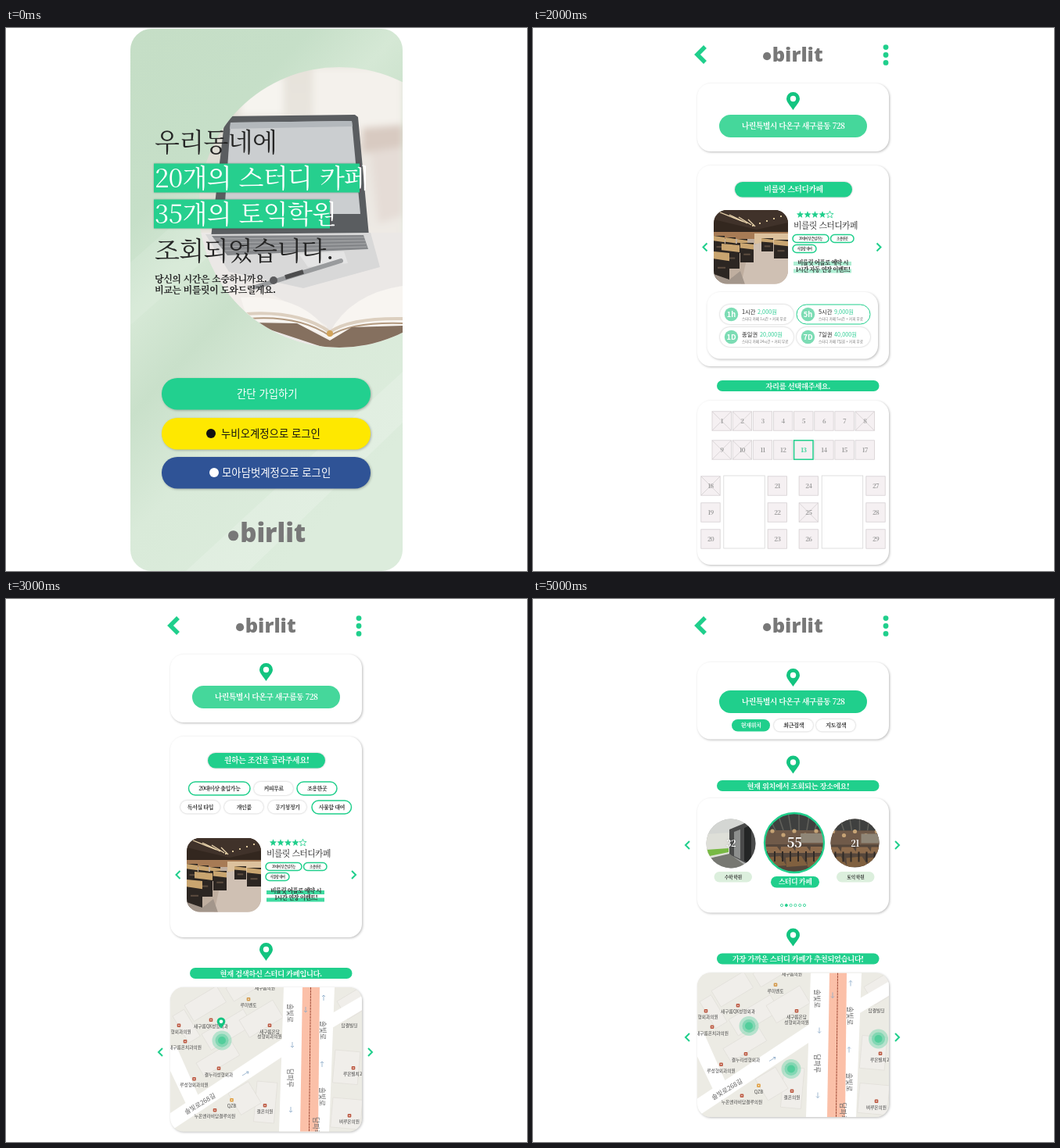
An HTML page that plays this animation: 666 px wide and 695 px high, repeating every 6 s.

```html
<!DOCTYPE html>
<html lang="ko">
<head>
<meta charset="utf-8">
<title>Study cafe app</title>
<style>
  html, body { margin: 0; width: 100%; height: 100%; overflow: hidden; background: #fff; }
  svg {
    display: block; width: 100%; height: 100%;
    font-family: "Noto Serif CJK KR", "Noto Serif KR", "Noto Serif", "Noto Sans CJK KR", serif;
    font-weight: 600; letter-spacing: -.04em;
  }
  .sans { font-family: "Noto Sans CJK KR", "Noto Sans", sans-serif; letter-spacing: 0; }
  .logo { font-family: "Open Sans", sans-serif; font-weight: 800; letter-spacing: 0; }
  .card { filter: drop-shadow(1px 1px 1.5px #0004); }
  .soft { filter: drop-shadow(.8px .8px 1px #0004); }
  .blur { filter: blur(5px); }
</style>
</head>
<body>
<svg id="stage" viewBox="0 0 666 695"></svg>
<script>
const GREEN = '#20cf8c', PIN = '#13c480', DARK = '#252525', CENTER = 332.5;
const REGULAR = 'font-weight="400"';

// Drawing helpers: every one returns SVG markup.
const rect = (x, y, w, h, fill, rx = 0, more = '') =>
  `<rect x="${x}" y="${y}" width="${w}" height="${h}" rx="${rx}" fill="${fill}" ${more}/>`;
const circle = (x, y, r, fill, more = '') => `<circle cx="${x}" cy="${y}" r="${r}" fill="${fill}" ${more}/>`;
const poly = (points, fill, more = '') => `<polygon points="${points}" fill="${fill}" ${more}/>`;
const line = (d, stroke, width = 1, more = '') =>
  `<path d="${d}" fill="none" stroke="${stroke}" stroke-width="${width}" ${more}/>`;
const text = (x, y, size, label, fill = DARK, more = '') =>
  `<text x="${x}" y="${y}" font-size="${size}" fill="${fill}" ${more}>${label}</text>`;
const mid = (x, y, size, label, fill, more = '') => text(x, y, size, label, fill, 'text-anchor="middle" ' + more);
const move = (x, y, body) => `<g transform="translate(${x} ${y})">${body}</g>`;
const clip = (id, shape, body) =>
  `<clipPath id="${id}">${shape}</clipPath><g clip-path="url(#${id})">${body}</g>`;
const repeat = (n, draw) => Array.from({ length: n }, (_, i) => draw(i)).join('');

const card = (y, bottom, x = 210, w = 245) => rect(x, y, w, bottom - y, '#fff', 17, 'class="card"');
const pill = (x, y, w, h, fill, label, size, color = '#fff', more = '') =>
  rect(x, y, w, h, fill, h / 2, more) + mid(x + w / 2, y + h / 2 + size * .36, size, label, color);
const chip = (x, y, w, h, label, size, on) =>
  pill(x, y, w, h, '#fff', label, size, DARK, on ? `stroke="${GREEN}" stroke-width="1.5"` : 'class="soft"');
const banner = (y, label) =>
  rect(235, y, 207.5, 14, GREEN, 7) + mid(CENTER + 6, y + 10.6, 9.6, label, '#fff');
const chevron = (x, y, dir, size = 5, width = 2) =>
  line(`M${x - dir * size / 2} ${y - size} l${dir * size} ${size} l${-dir * size} ${size}`, GREEN, width);
const arrows = (y, left = 197.5, right = 465.5) => chevron(left, y, -1) + chevron(right, y, 1);
const pin = (x, y, s = 1) => `<g transform="translate(${x} ${y}) scale(${s})">
  <path d="M0 23C-3 18-8.5 13-8.5 8.5a8.5 8.5 0 0 1 17 0C8.5 13 3 18 0 23z" fill="${PIN}"/>
  ${circle(0, 8.5, 3.7, '#fff')}</g>`;
const star = (x, y, full) => poly(repeat(10, i => {
  const a = i * Math.PI / 5, r = i % 2 ? 2.1 : 4.8;
  return `${(x + r * Math.sin(a)).toFixed(2)},${(y - r * Math.cos(a)).toFixed(2)} `;
}), full ? GREEN : '#fff', full ? '' : `stroke="${GREEN}" stroke-width=".8"`);
const logo = (x, y, size) => circle(x + size * .2, y - size * .25, size * .2, '#787878') +
  text(x + size * .46, y, size, 'birlit', '#787878', 'class="logo"');

const header = () => line('M220 24L210 34L220 44', GREEN, 5.5) +
  repeat(3, i => circle(451, 24.6 + i * 9.9, 3.4, GREEN)) + logo(294, 42.5, 25.5);
const address = (y, fill) => pill(238, y, 189, 29, fill, '나린특별시 다온구 새구름동 728', 10);

function laptopPhoto() {
  const room = rect(240, 45, 270, 370, 'url(#room)') +
    rect(240, 45, 55, 215, '#dedcd3') + rect(300, 62, 55, 50, '#f6f4ef') + rect(392, 50, 115, 95, '#f4f1ec') +
    poly('455,128 507,124 507,152 455,160', '#d8cac1') + poly('466,158 507,153 507,240 476,250', '#e5dcd6');
  return `<g class="blur">${room}</g>` +
    poly('247,262 507,262 507,410 260,410', '#ebe8e6') +
    poly('280,113 446,111 450,114 464,266 262,268', '#5a5d60') +
    poly('287,121 442,119 453,238 279,238', '#cbced0') + poly('287,121 442,119 443,126 286,129', '#b3b8bc') +
    poly('255,264 466,262 478,306 380,333 285,312', '#d8d8d8') +
    poly('263,266 457,265 463,283 283,291', '#85878a') +
    repeat(4, i => line(`M${266 + i * 4} ${270 + i * 5} L${458 + i} ${268 + i * 4}`, '#b4b5b6', .8)) +
    poly('375,290 432,286 437,301 386,306', '#e4e4e4') +
    line('M318 332L428 298', '#999b9d', 6, 'stroke-linecap="round"') +
    line('M357 319L380 312', '#4c4c4d', 6) + circle(342, 323, 5, '#5b5b5d') +
    poly('270,332 330,335 410,381 414,400 310,380', '#f2eeea') +
    '<path d="M300 345Q380 340 413 391Q440 340 507 330V385Q440 380 416 399Q370 370 310 377z" fill="#f8f5f1"/>' +
    line('M306 366Q374 361 414 389Q440 371 507 372', '#dccfbf', 4) +
    line('M310 372Q374 367 414 394Q442 376 507 378', '#b39a80', 2) +
    poly('310,377 372,378 414,400 442,383 507,381 507,410 410,410', '#85705f') +
    circle(414, 391, 4, '#d2a45b');
}

function home() {
  const button = (y, fill) => rect(199, y, 267, 40.5, fill, 20, 'class="card"');
  const login = (x, y, label, fill) => text(x, y, 13.4, label, fill, 'class="sans" font-weight="500"');
  const headline = (y, label, fill) => text(190, y, 33, label, fill, REGULAR);
  const marker = (y, w) => rect(189, y, w, 37, '#26cf8e', 0, 'class="soft"');
  return `<defs>
    <linearGradient id="mint" x1="0" y1="0" x2=".55" y2="1">
      <stop stop-color="#c5dec6"/><stop offset=".28" stop-color="#c6dfc8"/><stop offset=".42" stop-color="#d5e8d5"/>
      <stop offset=".55" stop-color="#c9e0ca"/><stop offset=".72" stop-color="#d9ead9"/><stop offset="1" stop-color="#dcecdc"/>
    </linearGradient>
    <linearGradient id="room" x2="0" y2="1"><stop stop-color="#e6e2da"/><stop offset="1" stop-color="#f3efec"/></linearGradient>
  </defs>` +
    clip('phone', rect(159, 1, 348, 694, '#000', 27),
      rect(159, 1, 348, 694, 'url(#mint)') +
      poly('507,440 507,505 310,695 230,695', '#fff', 'opacity=".16"') +
      poly('159,300 159,380 330,230 330,150', '#fff', 'opacity=".1"') +
      clip('lens', circle(426, 229.5, 179.5), laptopPhoto())) +
    marker(173.5, 263) + marker(219.5, 225) +
    headline(157.5, '우리동네에') +
    headline(203.5, '20개의 스터디 카페', '#fff') +
    headline(250, '35개의 토익학원', '#fff') +
    headline(296.5, '조회되었습니다.') +
    text(190, 326, 12.2, '당신의 시간은 소중하니까요.') +
    text(190, 340, 12.2, '비교는 비를릿이 도와드릴게요.') +
    button(448, '#22d08f') + button(499, '#fee800') + button(549, '#2f5396') +
    login(295, 473, '간단 가입하기', '#fff') +
    circle(262, 519, 6, '#111') + login(275, 523.5, '누비오계정으로 로그인', '#111') +
    circle(266, 569, 6, '#fff') + login(276, 574, '모아담벗계정으로 로그인', '#fff') +
    logo(284, 658, 33);
}

function cafePhoto() {
  const booth = (x, y, w, h) => rect(x, y, w, h, '#2c2622') +
    poly(`${x},${y} ${x + w},${y + 2} ${x + w},${y + h * .34} ${x},${y + h * .26}`, '#c9a570') +
    rect(x + w * .25, y + h * .55, w * .5, 2, '#5c4c3f');
  return rect(0, 0, 95, 95, '#bfae9f') + rect(0, 0, 95, 32, '#33271f') +
    poly('0,0 95,0 95,16 55,25 0,12', '#40322a') +
    repeat(4, i => line(`M${8 + i * 12} ${3 + i * 3}L${38 + i * 5} ${15 + i * 2}`, '#ecd6ae', 1.3)) +
    repeat(5, i => circle(50 + i * 9, 20 - i * 3, 1.1, '#ffe8b4')) +
    rect(0, 28, 95, 9, '#a77b55') + rect(52, 30, 43, 13, '#dcc19d') +
    poly('46,45 60,42 95,62 95,95 35,95', '#cfc0b3') +
    booth(61, 36, 15, 17) + booth(77, 38, 18, 24) +
    booth(0, 33, 14, 24) + booth(15, 35, 13, 22) + booth(30, 37, 13, 18) +
    booth(10, 43, 23, 32) + booth(34, 42, 17, 25) + booth(0, 53, 20, 36) +
    poly('0,82 20,89 34,78 40,95 0,95', '#a3968b');
}

function shop(y, event, stripe, stripeY) {
  return move(231, y, clip('cafe', rect(0, 0, 95, 94.5, '#000', 17), cafePhoto())) +
    repeat(5, i => star(341.5 + i * 9.5, y + 6, i < 4)) +
    text(333, y + 24, 10.9, '비를릿 스터디카페', DARK, REGULAR) +
    chip(332, y + 31.5, 46, 10, '20대이상 출입가능', 4.4, true) +
    chip(380.5, y + 31.5, 29.5, 10, '조용한곳', 4.4, true) +
    chip(332, y + 44.5, 30, 10, '사물함 대여', 4.4, true) +
    rect(333, y + stripeY, 74, 5, stripe) + rect(333, y + stripeY + 9.5, 74, 5, stripe) +
    mid(370.5, y + 70, 7.5, '비를릿 어플로 예약 시') + mid(370.5, y + 79, 7.5, event);
}

const ripple = (x, y) => circle(x, y, 12.5, '#5fd0a0', 'opacity=".4"') +
  circle(x, y, 8.5, '#45cb95', 'opacity=".45"') + circle(x, y, 5, '#35c88c', 'opacity=".6"');

function map(y, markers) {
  const place = (x, y, label, icon = '#bd5a43') =>
    (icon ? rect(x - 2.3, y - 12, 4.6, 4.6, icon, 1) + circle(x, y - 9.7, .8, '#fff') : '') +
    mid(x, y, 5.7, label, '#444', `class="sans" ${REGULAR}`);
  const road = (x, y, label, angle = 90, size = 8.7) =>
    mid(0, 3, size, label, '#666', `class="sans" ${REGULAR} transform="translate(${x} ${y}) rotate(${angle})"`);
  const block = (x, y, w, h, angle) =>
    `<g transform="translate(${x} ${y}) rotate(${angle})">${rect(0, 0, w, h, '#f0eeea', 0, 'stroke="#e2e0da" stroke-width=".8"')}</g>`;
  const lane = (x, y, dir) => line(`M${x} ${y}v${dir * 7}m-2 ${-dir * 2}l2 ${dir * 2}l2 ${-dir * 2}`, '#8caac8', .8);
  return rect(210, y, 245, 184.5, '#ecebe4', 17, 'class="card"') +
    clip('map', rect(210, y, 245, 184.5, '#000', 17), move(0, y - 497,
      rect(210, 497, 245, 185, '#ecebe4') +
      block(228, 520, 48, 24, -31) + block(281, 498, 44, 20, -31) + block(250, 557, 62, 24, -31) +
      block(298, 539, 50, 26, -31) + block(243, 594, 53, 20, -31) + block(213, 534, 17, 40, -31) +
      block(321, 617, 26, 52, 5) + block(284, 633, 30, 32, -31) + block(421, 577, 32, 42, 5) +
      block(418, 638, 38, 38, 5) + block(423, 515, 38, 27, -31) +
      poly('210,573 218,573 246,636 230,646 210,604', '#fff') +
      poly('210,658 356,561 356,584 210,681', '#fff') + poly('412,533 455,508 455,526 412,552', '#fff') +
      poly('355,497 420,497 413,682 349,682', '#fff') +
      poly('379,497 401,497 399,682 376,682', '#fbc0a8') +
      line('M389.5 497L387.5 682', '#9d4834', 1, 'stroke-dasharray="3 .7"') +
      lane(406, 514, -1) + lane(383, 522, 1) + lane(366, 567, 1) + lane(404, 599, -1) + lane(364, 650, 1) +
      line('M302 610l8-5m-3 0l3 0l-1 3', '#8caac8', .8) +
      road(363, 530, '솔빛로') + road(405, 552, '솔빛로') + road(363, 613, '담파루') +
      road(404, 637, '솔빛로') + road(396, 675, '담파루') + road(248, 646, '솔빛로268길', -31, 8.3) +
      place(331, 500, '새구름의원', '') + place(310, 522, '루미벤토', '#d39a4e') +
      place(262, 548.5, '새구름QX성형외과') + place(337, 555.5, '새구름온담') +
      place(337, 562, '성형외과의원', '') + place(221, 555.5, '성형외과의원') +
      place(229, 576, '새구름온치과의원') + place(272, 610.5, '결누리성형외과') +
      place(240.5, 624, '루성형외과의원') + place(288.5, 651, 'QZB', '#e0a044') +
      place(267, 664, '누온앤라비담결루의원') + place(331, 658, '결온의원') +
      place(439, 547.5, '담결빌딩', '') + place(444, 610, '루온별치과') + place(439, 671, '벼루온의원') +
      markers.map(([x, y]) => ripple(x, y)).join('')));
}

function filters() {
  return header() + card(71, 158) + pin(CENTER, 82) + address(111, '#45d79b') +
    card(176, 433) + pill(258, 197, 150, 19.5, GREEN, '원하는 조건을 골라주세요!', 10.1, '#fff', 'class="soft"') +
    chip(233.5, 234, 78.5, 17, '20대이상 출입가능', 7.2, true) + chip(317, 234, 50, 17, '커피무료', 7.2) +
    chip(372, 234, 51, 17, '조용한곳', 7.2, true) + chip(223, 258, 50.5, 16.5, '독서실 타입', 7.2) +
    chip(279, 258, 50, 16.5, '개인룸', 7.2) + chip(335, 258, 49, 16.5, '공기청정기', 7.2) +
    chip(391, 258, 50.5, 17, '사물함 대여', 7.2, true) +
    shop(306, '1시간 연장 이벤트!', '#3fdaa0', 67) + arrows(353, 220, 444.5) +
    pin(CENTER, 440) + banner(472, '현재 검색하신 스터디 카페입니다.') +
    map(497, [[276, 565]]) + pin(275, 535.5, .63) + arrows(580);
}

function seats() {
  const option = (x, y, badge, name, priceX, price, note, on) =>
    rect(x, y, 94, 25, '#fff', 12.5, on ? `stroke="${GREEN}"` : 'class="soft"') +
    circle(x + 14.5, y + 12.5, 8.7, '#7cdcb4') +
    mid(x + 14.5, y + 15.8, 9.3, badge, '#fff', 'class="sans" font-weight="700"') +
    text(x + 28, y + 12, 7.3, name, DARK, 'class="sans" font-weight="500"') +
    text(priceX, y + 12, 7.3, price, '#2fcf95', 'class="sans" font-weight="500"') +
    text(x + 28, y + 20, 4.5, `스터디 카페 ${note} + 커피 무료`, '#777', `class="sans" ${REGULAR}`);
  const taken = [1, 2, 8, 9, 10, 18, 25];
  const seat = (n, x, y) => {
    const on = n === 13, l = x - 12.2, t = y - 12.2;
    return rect(l, t, 24.4, 24.4, '#f5f0f2', 0, `stroke="${on ? GREEN : '#d5d0d2'}" stroke-width="${on ? 1.5 : .8}"`) +
      (taken.includes(n) ? line(`M${l} ${t}l24.4 24.4m0-24.4l-24.4 24.4`, '#cfcacc', .7) : '') +
      mid(x, y + 2.8, 8, n, on ? GREEN : '#999');
  };
  const row = (numbers, y) => numbers.map((n, i) => seat(n, 241.2 + i * 26.15, y)).join('');
  const column = (first, x) => repeat(3, i => seat(first + i, x, 586 + i * 34));
  const table = x => rect(x, 573, 52.5, 93, '#fff', 0, 'stroke="#d8d8d8" stroke-width=".8"');
  return header() + card(71, 158) + pin(CENTER, 82) + address(111, '#45d79b') +
    card(176, 433) + pill(258, 197, 150, 19.5, GREEN, '비를릿 스터디카페', 10.1, '#fff', 'class="soft"') +
    shop(233, '1시간 자동 연장 이벤트!', '#aeeed3', 66) + arrows(280.5, 220, 442) +
    card(338, 423.5, 222.5, 218.5) +
    option(239, 354, '1h', '1시간', 287, '2,000원', '1시간') +
    option(337, 354, '5h', '5시간', 385, '9,000원', '5시간', true) +
    option(239, 383, '1D', '종일권', 290, '20,000원', '24시간') +
    option(337, 383, '7D', '7일권', 385, '40,000원', '7일권') +
    banner(451, '자리를 선택해주세요.') + card(477, 687) +
    row([1, 2, 3, 4, 5, 6, 7, 8], 503) + row([9, 10, 11, 12, 13, 14, 15, 17], 540) +
    column(18, 227) + column(21, 312.3) + column(24, 352.3) + column(27, 438) + table(243.8) + table(369.2);
}

function diningPhoto() {
  return rect(-40, -40, 80, 80, '#55463b') + rect(-40, -40, 80, 24, '#3f403f') +
    repeat(6, i => line(`M${-36 + i * 14} -40L${-24 + i * 10} -16`, '#62615c', 1.5)) +
    rect(-40, -16, 80, 18, '#705a49') +
    repeat(5, i => circle(-28 + i * 14, -15 + i % 2 * 5, 2.6, '#c6a375')) +
    rect(8, -12, 30, 12, '#8f8677') +
    repeat(4, i => poly(`${-36 + i * 19},5 ${-22 + i * 19},5 ${-16 + i * 19},13 ${-37 + i * 19},13`, '#8d6b4c')) +
    repeat(3, i => poly(`${-38 + i * 27},19 ${-18 + i * 27},17 ${-10 + i * 27},29 ${-37 + i * 27},31`, '#80603f')) +
    repeat(8, i => line(`M${-35 + i * 10} 11v13`, '#302a26', 2));
}

function hallPhoto() {
  return rect(-32, -32, 64, 64, '#a9abaa') + poly('-32,-32 32,-32 10,-14 -32,-10', '#d4d6d3') +
    poly('-32,-12 -2,-14 -2,14 -32,20', '#dedfd8') + poly('-32,8 -3,6 -3,11 -32,17', '#78b944') +
    poly('-2,-18 32,-32 32,32 -2,14', '#4a4b4b') + poly('4,-15 12,-18 12,20 4,16', '#8d8f8e') +
    poly('17,-20 26,-24 26,28 17,22', '#242626') + poly('-32,20 -2,13 24,32 -32,32', '#777872');
}

function places() {
  const white = (x, y, size, label) => mid(x, y, size, label, '#fff', 'class="soft"');
  const round = (id, x, y, r, body) => move(x, y, clip(id, circle(0, 0, r), body));
  return header() + card(81, 179.5) + pin(CENTER, 89) + address(117, GREEN) +
    pill(254, 154, 49, 15.5, GREEN, '현재위치', 7.4) + chip(308, 154, 50, 15.5, '최근검색', 7.4) +
    chip(362, 154, 50, 15.5, '지도검색', 7.4) +
    pin(CENTER, 200.5) + banner(232, '현재 위치에서 조회되는 장소에요!') +
    card(255, 401.5) + arrows(315) +
    round('hall', 253, 313, 31.5, hallPhoto()) + white(253, 317, 11, 32) +
    round('dining', 334, 312, 38, diningPhoto()) + circle(334, 312, 38, 'none', `stroke="${GREEN}" stroke-width="2.3"`) +
    white(334, 318, 17, 55) +
    round('dining2', 411.5, 312.5, 31, diningPhoto()) + white(411.5, 317, 11, 21) +
    pill(231.5, 349, 48.5, 13.5, '#dcefdd', '수학 학원', 6, DARK) +
    pill(304, 355, 62, 14.5, GREEN, '스터디 카페', 9) +
    pill(388, 349, 48.5, 13.5, '#dcefdd', '토익 학원', 6, DARK) +
    repeat(6, i => circle(318 + i * 5.8, 392, 1.6, i === 1 ? GREEN : '#fff', `stroke="${GREEN}" stroke-width=".8"`)) +
    pin(CENTER, 421.5) + banner(453.5, '가장 가까운 스터디 카페가 추천되었습니다!') +
    map(478.5, [[276, 565], [330, 620], [441.5, 581.5]]) + arrows(561);
}

const stage = document.getElementById('stage');
const scenes = [home, filters, seats, filters, seats, places];
const start = performance.now();
let shown = -1;

function tick() {
  const index = Math.floor((performance.now() - start) / 1000) % scenes.length;
  if (index !== shown) stage.innerHTML = scenes[shown = index]();
  requestAnimationFrame(tick);
}
tick();
</script>
</body>
</html>
```
